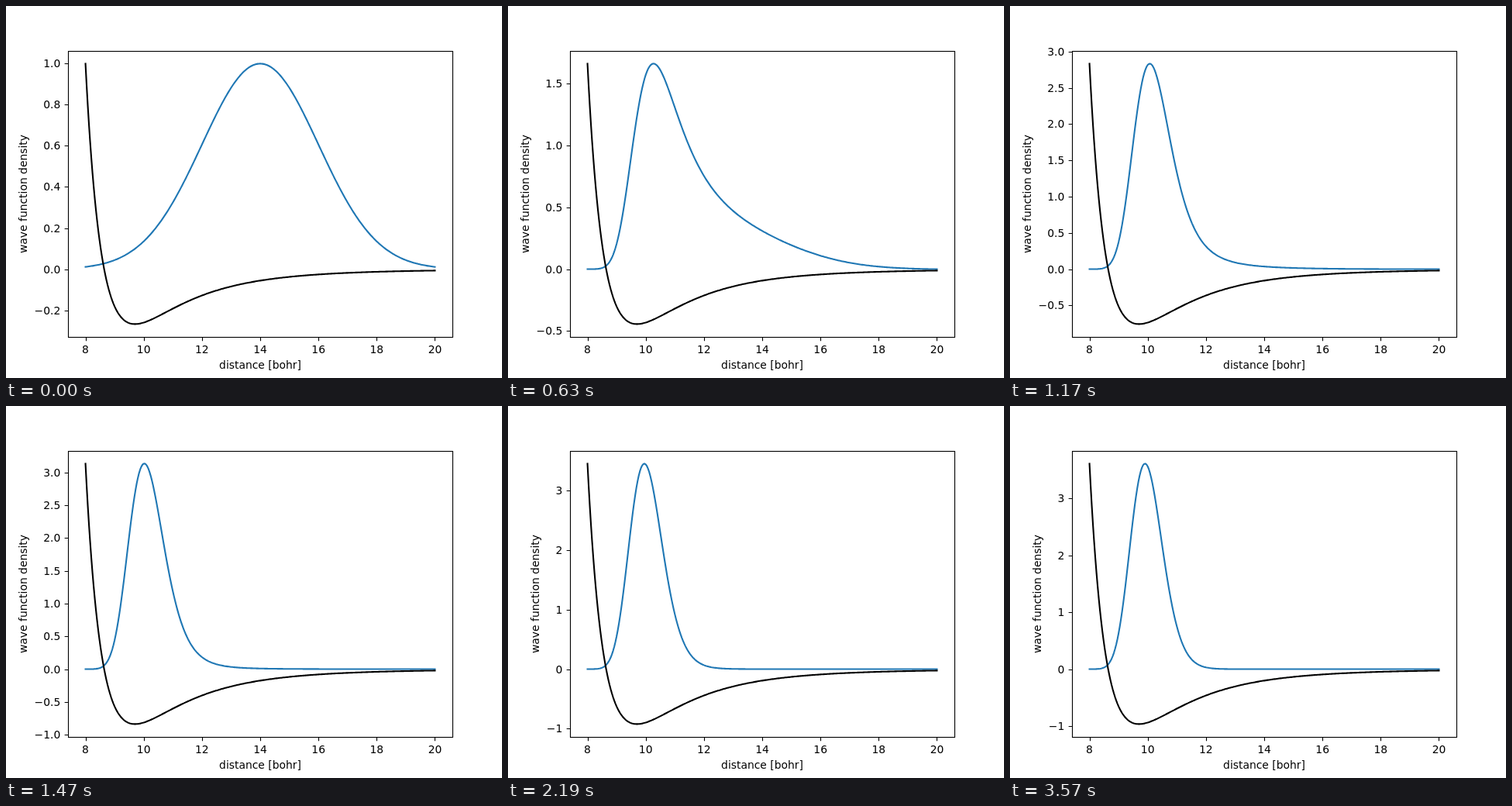
Animation, 640 px wide and 480 px high, one loop 3600 ms. Source, as an HTML page:

```html
<!DOCTYPE html>
<html lang="en">
<head>
<meta charset="utf-8">
<title>Wave function relaxation</title>
<style>
  html, body { margin: 0; width: 100%; height: 100%; overflow: hidden; background: #fff; }
  svg { display: block; width: 640px; height: 480px; }
  text { font: 13.89px "DejaVu Sans", sans-serif; fill: #000; text-anchor: middle; }
  .ticks text { text-anchor: end; }
  .axis { fill: none; stroke: #000; stroke-width: 1.11; }
  .curve { fill: none; stroke-width: 2.083; stroke-linejoin: round; stroke-linecap: square; }
</style>
</head>
<body>
<svg viewBox="0 0 640 480">
  <path id="density" class="curve" stroke="#1f77b4"/>
  <path id="well" class="curve" stroke="#000"/>
  <path id="xMarks" class="axis"/>
  <g id="xLabels"></g>
  <path id="yMarks" class="axis"/>
  <g id="yLabels" class="ticks"></g>
  <rect class="axis" x="80.5" y="58.5" width="496" height="369"/>
  <text x="328" y="468">distance [bohr]</text>
  <text id="yTitle">wave function density</text>
</svg>
<script>
const FRAMES = 120, FRAME_MS = 30, SUBSTEPS = 6;
const N = 301, X0 = 8, X1 = 20, DX = (X1 - X0) / (N - 1);
const R_MIN = 9.7;

const $ = id => document.getElementById(id);
const xs = Array.from({ length: N }, (_, i) => X0 + i * DX);

// Lennard-Jones well of unit depth
const lj = r => { const u = (R_MIN / r) ** 6; return u * u - 2 * u; };
const v = xs.map(lj);
const wall = v[0];

// Imaginary-time Crank-Nicolson relaxation, norm kept constant
function relax(dt, kin) {
  const h = dt / SUBSTEPS, k = kin / (DX * DX), off = -h * k / 2;
  const diag = v.map(e => 1 + h / 2 * (2 * k + e));
  const inv = new Float64Array(N), up = new Float64Array(N), tmp = new Float64Array(N);
  for (let i = 0; i < N; i++) {
    inv[i] = 1 / (diag[i] - (i ? off * up[i - 1] : 0));
    up[i] = off * inv[i];
  }
  const psi = Float64Array.from(xs, x => Math.exp(-((x - 14) ** 2) / 16));
  const norm = () => psi.reduce((s, p) => s + p * p, 0);
  const norm0 = norm(), out = [];
  for (let f = 0; f < FRAMES; f++) {
    const scale = norm0 / norm();
    out.push(psi.map(p => p * p * scale));
    for (let s = 0; s < SUBSTEPS; s++) {
      for (let i = 0; i < N; i++) {
        const sides = (i ? psi[i - 1] : 0) + (i < N - 1 ? psi[i + 1] : 0);
        const rhs = (2 - diag[i]) * psi[i] - off * sides;
        tmp[i] = (rhs - (i ? off * tmp[i - 1] : 0)) * inv[i];
      }
      psi[N - 1] = tmp[N - 1];
      for (let i = N - 2; i >= 0; i--) psi[i] = tmp[i] - up[i] * psi[i + 1];
    }
  }
  return out;
}

// Peak heights [step, height] that fix the time step and the kinetic factor
const PEAKS = [[12, .909], [30, 2.371], [39, 2.835], [59, 3.306], [89, 3.542], [119, 3.607]];

function calibrate() {
  const p = [Math.log(.12), Math.log(.11)], eps = .01;
  const solve = (a, b) => relax(Math.exp(a), Math.exp(b));
  const misfit = (a, b) => {
    const run = solve(a, b);
    return PEAKS.map(([f, h]) => Math.log(Math.max(...run[f]) / h));
  };
  const dot = (a, b) => a.reduce((s, e, i) => s + e * b[i], 0);
  const clamp = d => Math.max(-.25, Math.min(.25, d));
  for (let n = 0; n < 7; n++) {
    const r = misfit(p[0], p[1]);
    const ja = misfit(p[0] + eps, p[1]).map((e, i) => (e - r[i]) / eps);
    const jb = misfit(p[0], p[1] + eps).map((e, i) => (e - r[i]) / eps);
    const aa = dot(ja, ja), bb = dot(jb, jb), ab = dot(ja, jb);
    const ra = dot(ja, r), rb = dot(jb, r), det = aa * bb - ab * ab;
    p[0] -= clamp((bb * ra - ab * rb) / det);
    p[1] -= clamp((aa * rb - ab * ra) / det);
  }
  return solve(p[0], p[1]);
}

// Plot geometry
const LEFT = 80, BOTTOM = 427.2, TOP = 57.6;
const PAD = .05 / 1.1, HEIGHT = BOTTOM - TOP;
const peakY = TOP + HEIGHT * PAD;
const unit = HEIGHT / 1.1 / (1 + 1 / wall);
const zeroY = peakY + unit;
const px = x => LEFT + 496 * (PAD + (x - X0) / (X1 - X0) / 1.1);
const snap = c => Math.floor(c + .5) + .5;
const line = (ys, max) => "M" + xs.map((x, i) =>
  px(x).toFixed(2) + " " + (zeroY - ys[i] / max * unit).toFixed(2)).join("L");
const label = (x, y, s) => `<text x="${x}" y="${y}">${s}</text>`;

function yAxis(max) {
  const span = HEIGHT / unit * max;
  const step = [.1, .2, .25, .5, 1].find(s => s >= span / 9);
  const places = step === 1 ? 0 : step === .25 ? 2 : 1;
  const low = (zeroY - BOTTOM) / unit * max;
  let marks = "", labels = "";
  for (let k = Math.ceil(low / step); k * step <= low + span; k++) {
    const y = snap(zeroY - k * step / max * unit);
    marks += `M80.5 ${y}h-4.86`;
    labels += label(70.3, y + 4.5, (k * step).toFixed(places).replace("-", "\u2212"));
  }
  return { marks, labels, titleX: [40, 27, 18][places] };
}

const frames = calibrate().map(d => {
  const max = Math.max(...d);
  return { path: line(d, max), ...yAxis(max) };
});

$("well").setAttribute("d", line(v, wall));
const xTicks = [8, 10, 12, 14, 16, 18, 20];
$("xMarks").setAttribute("d", xTicks.map(x => `M${snap(px(x))} 427.5v4.86`).join(""));
$("xLabels").innerHTML = xTicks.map(x => label(px(x).toFixed(1), 448, x)).join("");

let shown = -1;
function show(i) {
  if (i === shown) return;
  shown = i;
  const f = frames[i];
  $("density").setAttribute("d", f.path);
  $("yMarks").setAttribute("d", f.marks);
  $("yLabels").innerHTML = f.labels;
  $("yTitle").setAttribute("transform", `translate(${f.titleX} 242.5) rotate(-90)`);
}

show(0);
const start = performance.now();
function tick() {
  show(Math.floor((performance.now() - start) / FRAME_MS) % FRAMES);
  requestAnimationFrame(tick);
}
requestAnimationFrame(tick);
</script>
</body>
</html>
```
